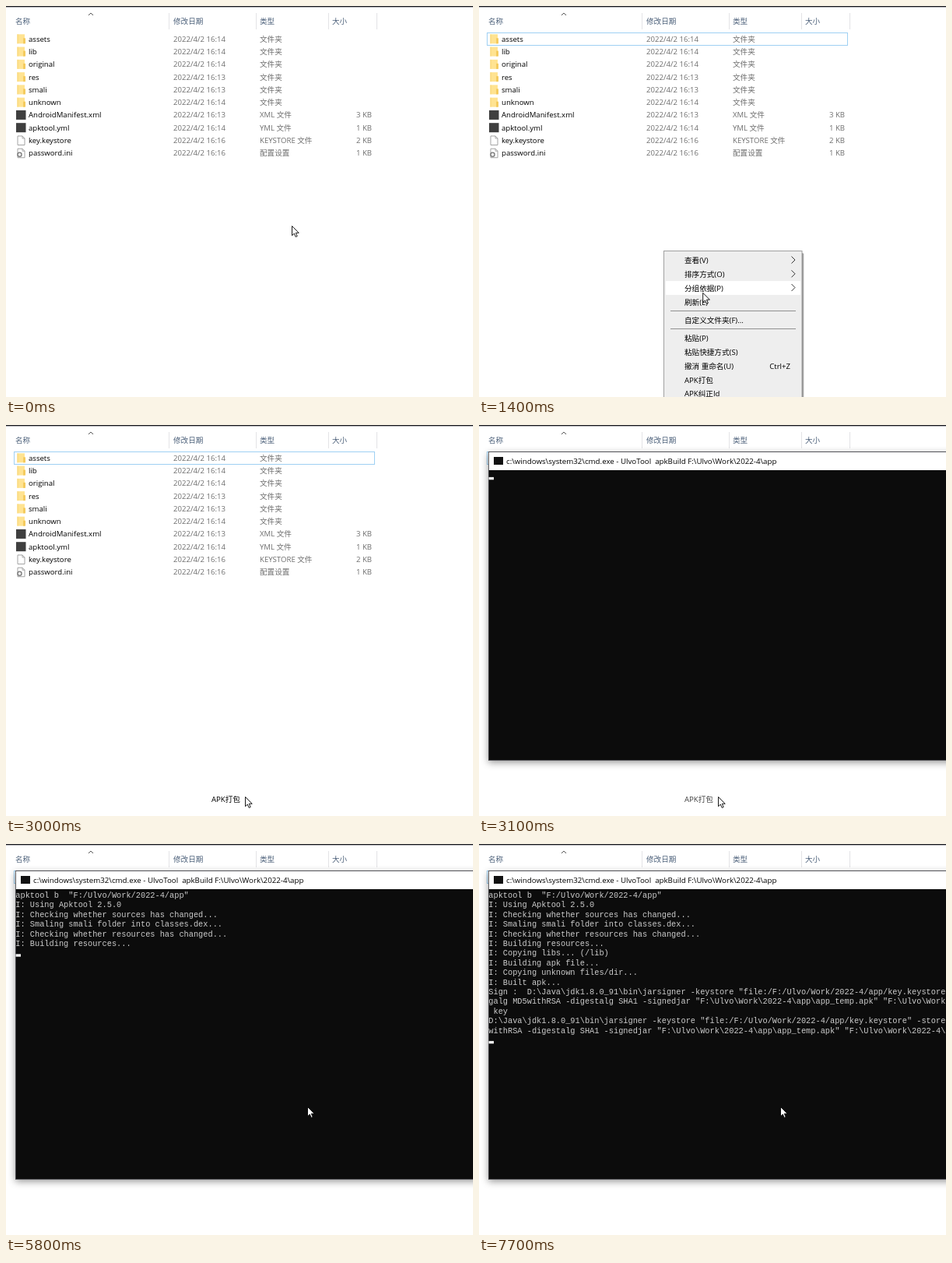
These frames come from a looping animation (600x502 px, 8 s). An HTML page:

```html
<!DOCTYPE html>
<html lang="zh-CN">
<head>
<meta charset="utf-8">
<style>
  html, body { margin: 0; width: 100%; height: 100%; overflow: hidden; background: #fff; }
  svg { display: block; width: 600px; height: 502px; }
  text { font: 9.6px "Open Sans", "Noto Sans CJK SC", "Noto Sans CJK", sans-serif; white-space: pre; }
  #lines text { font: 10.3px "Liberation Mono", monospace; fill: #ccc; }
  #console { filter: drop-shadow(0 3px 5px rgba(0, 0, 0, .4)); }
</style>
</head>
<body>
<svg id="stage" viewBox="0 0 600 502"></svg>
<script>
const LOOP = 8000, STEP = 100;

const files = [
  ['folder', 'assets', 14], ['folder', 'lib', 14], ['folder', 'original', 14],
  ['folder', 'res', 13], ['folder', 'smali', 13], ['folder', 'unknown', 14],
  ['code', 'AndroidManifest.xml', 13, 'XML 文件', 3],
  ['code', 'apktool.yml', 14, 'YML 文件', 1],
  ['page', 'key.keystore', 16, 'KEYSTORE 文件', 2],
  ['config', 'password.ini', 16, '配置设置', 1]
];

// label, centre y, extra
const menuItems = [
  ['查看(V)', 326.5, '>'], ['排序方式(O)', 344.3, '>'], ['分组依据(P)', 362, '>'],
  ['刷新(E)', 380], ['自定义文件夹(F)...', 403.5], ['粘贴(P)', 426.5],
  ['粘贴快捷方式(S)', 444.3], ['撤消 重命名(U)', 462, 'Ctrl+Z'],
  ['APK打包', 480], ['APK纠正Id', 497.7]
];
const ROW = 17.8;

const output = String.raw`apktool b  "F:/Ulvo/Work/2022-4/app"
I: Using Apktool 2.5.0
I: Checking whether sources has changed...
I: Smaling smali folder into classes.dex...
I: Checking whether resources has changed...
I: Building resources...
I: Copying libs... (/lib)
I: Building apk file...
I: Copying unknown files/dir...
I: Built apk...
Sign :  D:\Java\jdk1.8.0_91\bin\jarsigner -keystore "file:/F:/Ulvo/Work/2022-4/app/key.keystore"
galg MD5withRSA -digestalg SHA1 -signedjar "F:\Ulvo\Work\2022-4\app\app_temp.apk" "F:\Ulvo\Work\
 key
D:\Java\jdk1.8.0_91\bin\jarsigner -keystore "file:/F:/Ulvo/Work/2022-4/app/key.keystore" -storepass
withRSA -digestalg SHA1 -signedjar "F:\Ulvo\Work\2022-4\app\app_temp.apk" "F:\Ulvo\Work\2022-4\app`.split('\n');
const LINE = 12.4;

// time, number of printed lines
const printed = [[0, 0], [3200, 1], [3300, 3], [3400, 4], [5800, 6], [7300, 8], [7500, 10], [7600, 13], [7700, 15]];

// time, x, y of the pointer tip
const path = [
  [0, 367, 282], [500, 238, 314], [600, 239, 316], [700, 245, 327], [900, 254, 347],
  [1300, 284, 391], [1800, 300, 275], [2200, 307, 477], [4000, 307, 477],
  [4500, 383, 331], [4600, 383, 331], [4900, 386, 336], [5000, 386, 336], [5100, 387, 337], [LOOP, 387, 337]
];

const text = (x, y, s, fill = '#000', more = '') =>
  `<text x="${x}" y="${y + 3.5}" fill="${fill}" ${more}>${s}</text>`;
const rect = (x, y, w, h, fill, more = '') =>
  `<rect x="${x}" y="${y}" width="${w}" height="${h}" fill="${fill}" ${more}/>`;
const stroke = (d, color, width = 1) =>
  `<path d="${d}" fill="none" stroke="${color}" stroke-width="${width}"/>`;

const sheet = y => `<path d="M15 ${y - 5.5}h6l3 3v8.5h-9z" fill="#fff" stroke="#999" stroke-width=".9"/>`
  + stroke(`M21 ${y - 5.5}v3h3`, '#999', .8);
const icons = {
  folder: y => rect(14.5, y - 6, 9.5, 12, '#ffe391') + rect(22, y - 1, 3, 7, '#f4cb5e')
    + rect(14.5, y - 6, 1, 12, '#f7d673'),
  code: y => rect(13, y - 6, 12.5, 12, '#3f3f3f'),
  page: sheet,
  config: y => sheet(y) + `<circle cx="17.5" cy="${y + 2}" r="2.6" fill="#eee" stroke="#777" stroke-width="1.3"/>`
};

function explorer() {
  const heads = [[12, '名称'], [215, '修改日期'], [326, '类型'], [419, '大小']];
  const rows = files.map(([icon, name, minute, type = '文件夹', size], i) => {
    const y = 42.3 + 16.27 * i, gray = '#6d6d6d';
    return icons[icon](y) + text(29, y, name)
      + text(215, y, `2022/4/2 16:${minute}`, gray) + text(326, y, type, gray)
      + (size ? text(470, y, size + ' KB', gray, 'text-anchor="end"') : '');
  });
  return rect(0, 0, 600, 502, '#fff') + rect(0, 0, 600, 1, '#1c1c20') + rect(0, 1, 600, 1, '#a9a9ad')
    + heads.map(([x, s]) => text(x, 19, s, '#4c607a')).join('')
    + [209, 321, 414, 476].map(x => rect(x, 9, 1, 21, '#e3e3e6')).join('')
    + stroke('M106 12l3-3l3 3', '#555') + rows.join('');
}

function menu() {
  const extra = (y, s) => !s ? '' : s === '>'
    ? stroke(`M401.5 ${y - 5}l4.5 4.5l-4.5 4.5`, '#333')
    : text(400, y, s, '#000', 'text-anchor="end"');
  return rect(241, 318, 176.5, 190, '#000', 'opacity=".2"') + rect(240, 317, 176.5, 190, '#000', 'opacity=".35"')
    + rect(237.5, 314.5, 177.5, 200, '#eee', 'stroke="#a0a0a0"')
    + rect(240, 0, 173, ROW, '#fff', 'id="hover"')
    + [391, 414].map(y => rect(246, y, 161, 1, '#919191')).join('')
    + menuItems.map(([s, y, more]) => text(264, y, s) + extra(y, more)).join('');
}

function consoleWindow() {
  const title = String.raw`c:\windows\system32\cmd.exe - UlvoTool  apkBuild F:\Ulvo\Work\2022-4\app`;
  return `<g id="console">${rect(12, 34, 620, 396.5, '#0c0c0c')}</g>`
    + rect(12, 34, 600, 1, '#55555a') + rect(12.5, 35, 600, 23, '#fff')
    + rect(12, 34, .8, 396.5, '#55555a') + rect(12, 430, 600, .8, '#55555a')
    + rect(19, 41, 12, 10, '#111') + text(35, 46, title, '#000', 'style="font-size:9.72px"')
    + '<g id="lines">' + output.map((s, i) => text(12.3, 65.4 + LINE * i, s)).join('') + '</g>'
    + rect(12.5, 0, 6.5, 3.4, '#f2f2f2', 'id="caret"');
}

document.getElementById('stage').innerHTML = explorer()
  + '<rect id="focus" x="10.5" y="34.5" width="463" height="16" fill="none" stroke="#9fd0f3"/>'
  + `<g id="menu">${menu()}</g><g id="window">${consoleWindow()}</g>`
  + text(264, 480, 'APK打包', '#000', 'id="chosen"')
  + '<path id="pointer" d="M.5 .5V12.7L3.3 10.1L5.2 14.4L7.2 13.5L5.3 9.3H9.2Z" fill="#fff" stroke="#000" stroke-width=".9"/>';

const $ = id => document.getElementById(id);
const parts = Object.fromEntries(['focus', 'menu', 'hover', 'window', 'caret', 'chosen', 'pointer'].map(id => [id, $(id)]));
const lineNodes = [...$('lines').children];
const show = (node, on) => node.style.visibility = on ? 'inherit' : 'hidden';

function pointerAt(t) {
  const i = path.findIndex(p => p[0] > t);
  const [t0, x0, y0] = path[i - 1], [t1, x1, y1] = path[i];
  const k = (t - t0) / (t1 - t0);
  return [x0 + (x1 - x0) * k, y0 + (y1 - y0) * k];
}

function render(time) {
  const t = Math.floor(time % LOOP / STEP) * STEP;
  const [x, y] = pointerAt(t);
  parts.pointer.setAttribute('transform', `translate(${x} ${y})`);

  const menuOpen = t >= 600 && t < 3000;
  show(parts.menu, menuOpen);
  show(parts.focus, t >= 600);
  const item = menuItems.find(m => Math.abs(m[1] - y) < ROW / 2);
  show(parts.hover, menuOpen && item);
  if (item) parts.hover.setAttribute('y', item[1] - ROW / 2);

  show(parts.chosen, t >= 3000 && t < 3400);
  parts.chosen.style.opacity = 1 - (t - 3000) / 400;

  show(parts.window, t >= 3100);
  const count = printed.filter(p => p[0] <= t).pop()[1];
  lineNodes.forEach((node, i) => show(node, i < count));
  parts.caret.setAttribute('y', 66.9 + LINE * count);
}

const start = performance.now();
function tick() {
  render(performance.now() - start);
  requestAnimationFrame(tick);
}
tick();
</script>
</body>
</html>
```
